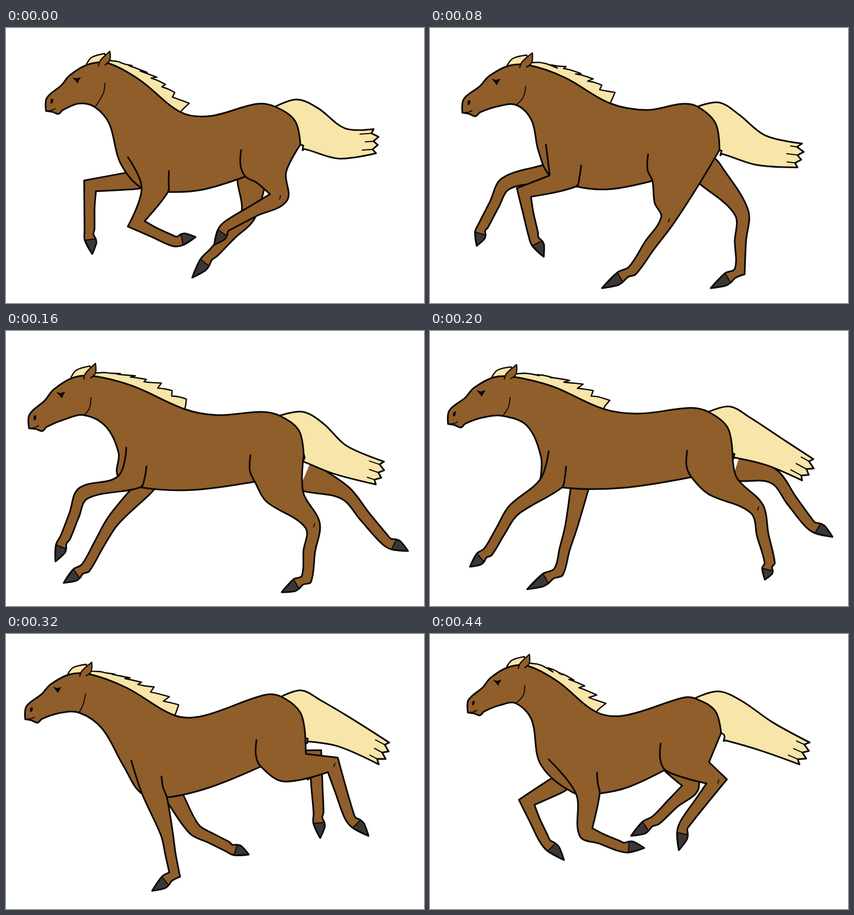
Recreate the animation shown at these times as an HTML page. Size 761 by 500 pixels, loop 0.48 s.

```html
<!DOCTYPE html>
<html lang="en">
<head>
<meta charset="utf-8">
<title>Galloping horse</title>
<style>
html, body { margin: 0; width: 100%; height: 100%; overflow: hidden; background: #fff; }
svg { display: block; width: 761px; height: 500px; }
path { stroke: #0b0805; stroke-linejoin: round; stroke-linecap: round; }
</style>
</head>
<body>
<svg id="stage" viewBox="0 0 761 500"></svg>
<script>
const STEP = 40, STEPS = 12;
const COAT = '#8f5e2a', HAIR = '#f8e5aa', HOOF = '#3b3737', INK = '#0b0805';

const parse = s => s.split(' ').map(p => p.split(',').map(Number));
const keys = [];
function pose(step, rig) {
  for (const k in rig) rig[k] = parse(rig[k]);
  keys.push({ step, rig });
}

// head: mouth, poll. back: buttock, dock, croup, loin, withers.
// under: throat, neck, chest, brisket, elbow, flank. tail: three spine points.
// Legs end in joint, fetlock, toe; far legs start at a root, the near hind at stifle and gaskin.
pose(0, {
  head: '73,151 186,64', back: '536,212 490,143 456,138 372,160 318,153',
  under: '162,144 188,174 208,245 247,291 295,298 436,270', tail: '556,183 612,210 668,206',
  foreNear: '237,356 304,388 345,380', foreFar: '232,277 153,287 151,367 157,411',
  hindNear: '456,281 510,262 496,308 404,358 379,394', hindFar: '447,280 440,343 377,408 339,454'
});
pose(2, {
  head: '59,154 182,68', back: '527,222 487,143 458,138 395,149 328,137',
  under: '157,140 185,168 197,222 218,268 266,288 405,278', tail: '547,193 602,222 668,231',
  foreNear: '171,299 187,375 207,416', foreFar: '208,265 138,283 96,359 85,396',
  hindNear: '409,318 488,287 432,350 368,440 313,473', hindFar: '508,264 567,335 563,442 511,473'
});
pose(4, {
  head: '42,177 160,82', back: '542,225 498,154 465,147 385,153 325,142',
  under: '142,153 182,174 205,222 204,264 245,284 453,274', tail: '560,203 608,234 677,257',
  foreNear: '141,295 107,375 90,419', foreFar: '250,286 195,345 144,430 105,458',
  hindNear: '474,310 541,293 558,353 546,450 502,475', hindFar: '555,268 618,295 689,380 732,400'
});
pose(6, {
  head: '27,158 150,82', back: '556,215 513,136 480,129 378,147 308,142',
  under: '125,153 172,170 200,236 205,277 244,287 490,256', tail: '574,180 640,200 690,238',
  foreNear: '181,358 134,428 92,441', foreFar: '291,287 315,360 326,430 268,465',
  hindNear: '530,283 567,238 613,286 662,385 690,422', hindFar: '575,228 623,240 660,325 691,359'
});
pose(8, {
  head: '35,155 152,73', back: '545,190 501,114 470,111 358,149 307,148',
  under: '133,143 175,172 214,240 248,291 293,297 464,241', tail: '562,158 617,179 684,215',
  foreNear: '293,364 306,437 266,467', foreFar: '307,297 343,355 402,387 442,401',
  hindNear: '505,268 546,218 595,238 624,331 660,367', hindFar: '548,236 564,228 568,325 572,371'
});
pose(10, {
  head: '58,146 176,64', back: '540,185 483,113 460,114 367,150 307,149',
  under: '148,131 180,161 210,250 274,299 319,294 441,243', tail: '553,153 612,181 684,200',
  foreNear: '314,361 375,396 416,423', foreFar: '256,290 244,350 309,392 354,400',
  hindNear: '470,265 526,233 553,252 528,345 533,395', hindFar: '480,234 504,265 461,345 437,386'
});
pose(11, {
  head: '69,143 178,58', back: '530,180 482,117 460,116 355,148 303,142',
  under: '156,126 185,156 202,238 266,291 309,290 428,247', tail: '552,157 612,186 677,215',
  foreNear: '284,360 343,386 390,389', foreFar: '231,275 176,306 206,372 244,411',
  hindNear: '465,262 508,233 522,268 464,343 453,393', hindFar: '450,236 474,278 410,338 366,367'
});

// The head keeps one shape, relative to the mouth with the poll at 118,-85.
const POLL = [118, -85];
const FACE = parse('81,-84 46,-65 30,-47 2,-24 0,0 12,2 23,6 31,-1 62,-12');
const EAR = parse('100,-81 104,-91 122,-107 121,-90 112,-82');
const FORELOCK = parse('78,-85 88,-97 112,-103 116,-92');
const EYE = parse('52,-60 58,-58 66,-60 63,-56 60,-50 56,-55');
const NOSTRIL = parse('9,-15 10,-21 13,-22 13,-17 11,-14');
const MOUTH = parse('0,0 10,-1 17,-4');
const JAW = parse('111,-48 107,-29');

const svg = document.getElementById('stage');
const els = {};
function layer(name, fill, width) {
  const el = document.createElementNS('http://www.w3.org/2000/svg', 'path');
  el.setAttribute('fill', fill);
  el.setAttribute('stroke-width', width);
  els[name] = svg.appendChild(el);
}
function legLayers(name) {
  layer(name, COAT, 3);
  layer(name + 'Hoof', HOOF, 2);
}
legLayers('hindFar');
legLayers('foreFar');
layer('tail', HAIR, 3);
layer('strands', 'none', 2);
layer('mane', HAIR, 2.4);
layer('body', COAT, 3);
legLayers('hindNear');
legLayers('foreNear');
layer('ear', COAT, 2.2);
layer('lines', 'none', 1.8);
layer('marks', INK, 1);

const add = (p, x, y) => [p[0] + x, p[1] + y];
const off = (p, n, r) => add(p, n[0] * r, n[1] * r);
const mix = (a, b, t) => [a[0] + (b[0] - a[0]) * t, a[1] + (b[1] - a[1]) * t];
const unit = (a, b) => {
  const x = b[0] - a[0], y = b[1] - a[1], len = Math.hypot(x, y) || 1;
  return [x / len, y / len];
};
const side = (a, b) => { const [x, y] = unit(a, b); return [-y, x]; };
const miter = (a, b) => {
  const x = a[0] + b[0], y = a[1] + b[1], len = Math.hypot(x, y) || 1;
  const k = 1 / (len * Math.max(len / 2, 0.62));
  return [x * k, y * k];
};
const noise = (i, seed) => {
  const v = Math.sin(i * 12.99 + seed * 78.23) * 43758.5;
  return v - Math.floor(v);
};
const fmt = p => p[0].toFixed(1) + ' ' + p[1].toFixed(1);
const poly = pts => 'M' + pts.map(fmt).join('L');

// Smooth line through the points, left sharp wherever it turns steeply.
function curve(pts) {
  const last = pts.length - 1;
  const dir = pts.map((p, i) => {
    if (!i || i === last) return [0, 0];
    const a = unit(pts[i - 1], p), b = unit(p, pts[i + 1]);
    return a[0] * b[0] + a[1] * b[1] < 0.4 ? [0, 0] : unit(pts[i - 1], pts[i + 1]);
  });
  let d = 'M' + fmt(pts[0]);
  for (let i = 0; i < last; i++) {
    const a = pts[i], b = pts[i + 1], r = Math.hypot(b[0] - a[0], b[1] - a[1]) / 3;
    d += 'C' + [off(a, dir[i], r), off(b, dir[i + 1], -r), b].map(fmt).join(' ');
  }
  return d;
}

// Cubic motion through the poses, wrapping around the loop.
function rigAt(step) {
  const n = keys.length;
  const key = i => {
    const k = keys[(i + n) % n];
    return { t: k.step + STEPS * Math.floor(i / n), rig: k.rig };
  };
  let i = n - 1;
  while (keys[i].step > step) i--;
  const [a, b, c, d] = [key(i - 1), key(i), key(i + 1), key(i + 2)];
  const h = c.t - b.t, s = (step - b.t) / h, s2 = s * s, s3 = s2 * s;
  const blend = (p, q, r, w) => {
    const m = (r - p) / (c.t - a.t) * h, k = (w - q) / (d.t - b.t) * h;
    return (2 * s3 - 3 * s2 + 1) * q + (s3 - 2 * s2 + s) * m + (3 * s2 - 2 * s3) * r + (s3 - s2) * k;
  };
  const out = {};
  for (const name in b.rig)
    out[name] = b.rig[name].map((q, j) => q.map((v, x) =>
      blend(a.rig[name][j][x], v, c.rig[name][j][x], d.rig[name][j][x])));
  return out;
}

const set = (name, d) => els[name].setAttribute('d', d);

// Lower leg: joint, cannon, fetlock and hoof, thickened around the bones.
function drawLeg(name, root, [joint, fet, toe], r, before, after) {
  const nc = side(joint, fet), nh = side(fet, toe);
  const nj = miter(side(root, joint), nc), nf = miter(nc, nh);
  const shin = mix(joint, fet, 0.5), crown = mix(fet, toe, 0.4);
  const hoof = [off(crown, nh, 10), toe, off(mix(crown, toe, 0.3), nh, -10), off(crown, nh, -10)];
  set(name, curve([
    ...before, off(joint, nj, r), off(shin, nc, r * 0.85), off(fet, nf, 8), ...hoof,
    off(mix(fet, crown, 0.5), nh, -7), off(fet, nf, -10), off(shin, nc, -r * 0.85), off(joint, nj, -r),
    ...after
  ]));
  set(name + 'Hoof', poly(hoof) + 'Z');
}

function drawFarLeg(name, [root, ...bones], rootWidth, r) {
  const n = side(root, bones[0]), top = off(root, unit(root, bones[0]), -12);
  drawLeg(name, root, bones, r, [off(top, n, rootWidth), off(root, n, rootWidth)],
    [off(root, n, -rootWidth), off(top, n, -rootWidth)]);
}

function drawTail(dock, buttock, [a, b, tip], seed) {
  const na = side(mix(dock, buttock, 0.5), b), nb = side(a, tip), nt = side(b, tip);
  const out = unit(b, tip), top = off(a, na, -39), low = off(a, na, 39);
  const fringe = [];
  let strands = '';
  for (let k = 0; k <= 6; k++) {
    const u = k / 3 - 1, reach = 6 * (1 - u * u) + (k % 2 ? -5 : 3 + 4 * noise(k, seed));
    const p = off(off(tip, nt, 22 * u), out, reach);
    fringe.push(p);
    if (k % 2) strands += poly([p, off(p, out, -12 - 10 * noise(k, seed))]);
  }
  set('tail', curve([
    dock, off(mix(dock, top, 0.45), na, -15), top, off(b, nb, -28), ...fringe,
    off(b, nb, 28), low, off(mix(low, buttock, 0.3), na, 5), off(mix(low, buttock, 0.45), na, -3), buttock
  ]));
  set('strands', strands);
}

// Locks swept back along the crest of the neck.
function drawMane(forelock, poll, nape, withers, seed) {
  const d = unit(poll, withers), n = [d[1], -d[0]];
  const crest = s => mix(mix(poll, nape, s), mix(nape, withers, s), s);
  const pts = [...forelock, off(poll, n, 6)];
  for (let i = 0; i < 6; i++) {
    const s = 0.1 + 0.15 * i, h = 8 + 10 * Math.sin(Math.PI * s);
    const root = off(crest(s), n, h);
    pts.push(root, off(off(root, d, 12), n, 3), off(off(root, d, 25 + 10 * noise(i, seed)), n, 4 + 5 * noise(i + 9, seed)));
  }
  set('mane', curve([...pts, off(withers, n, 5), withers]));
}

function draw(step) {
  const { head, back, under, tail, foreNear, foreFar, hindNear, hindFar } = rigAt(step);
  const [mouth, poll] = head;
  const [buttock, dock, croup, loin, withers] = back;
  const [throat, neck, chest, brisket, elbow, flank] = under;
  const [stifle, gaskin, ...hindBones] = hindNear;

  const dx = poll[0] - mouth[0], dy = poll[1] - mouth[1], q = POLL[0] ** 2 + POLL[1] ** 2;
  const c = (dx * POLL[0] + dy * POLL[1]) / q, s = (dy * POLL[0] - dx * POLL[1]) / q;
  const place = pts => pts.map(([x, y]) => add(mouth, x * c - y * s, x * s + y * c));

  const nape = add(mix(poll, withers, 0.42), 2, -7);
  const rump = add(mix(dock, buttock, 0.5), 13, -9);
  const belly = add(mix(elbow, flank, 0.5), -8, 10);
  set('body', curve([
    buttock, rump, dock, croup, loin, withers, nape, poll, ...place(FACE),
    throat, neck, chest, brisket, elbow, belly, flank
  ]));

  drawFarLeg('hindFar', hindFar, 26, 12);
  drawFarLeg('foreFar', foreFar, 16, 11);
  drawLeg('hindNear', mix(stifle, gaskin, 0.5), hindBones, 12.5,
    [add(flank, -8, -48), add(flank, -9, -20), flank, stifle], [gaskin, buttock]);
  const lean = (elbow[0] - foreNear[0][0]) * 0.2 - 10;
  drawLeg('foreNear', mix(brisket, elbow, 0.5), foreNear, 11,
    [add(chest, 14, -10), brisket], [elbow, add(elbow, lean * 0.7, -18), add(elbow, lean, -38)]);

  drawTail(dock, buttock, tail, step);
  drawMane(place(FORELOCK), poll, nape, withers, step);

  const hock = hindBones[0];
  set('ear', curve(place(EAR)));
  set('lines', curve([...place(JAW), throat]) + curve(place(MOUTH)) + poly([add(hock, 4, -3), add(hock, 2, 3)]));
  set('marks', poly(place(EYE)) + 'Z' + curve(place(NOSTRIL)) + 'Z');
}

let shown = -1;
function tick() {
  const step = Math.floor(performance.now() / STEP) % STEPS;
  if (step !== shown) draw(shown = step);
  requestAnimationFrame(tick);
}
tick();
</script>
</body>
</html>
```
